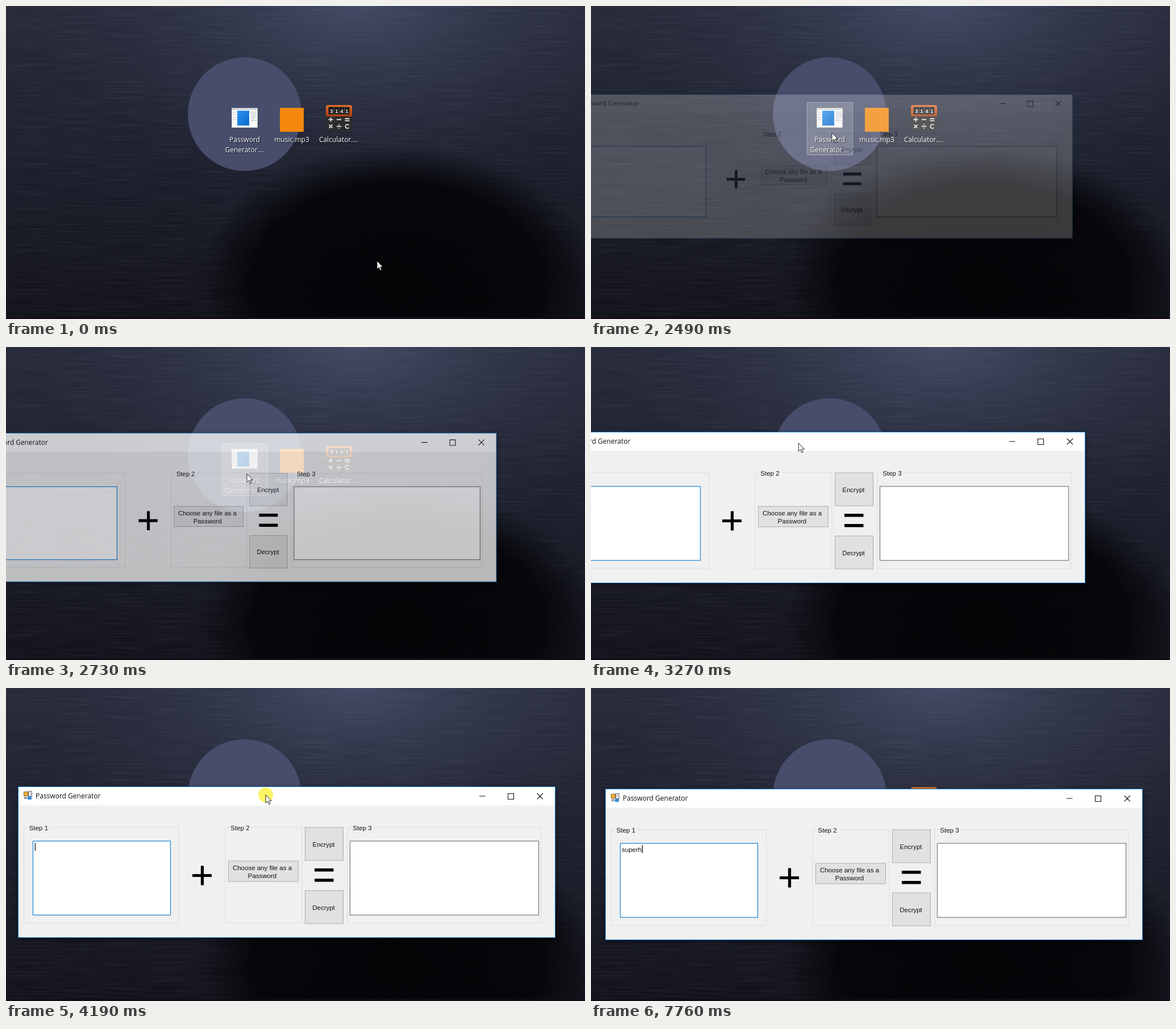
Animation of 1019 by 550 pixels, one loop 8000 ms. Source, as an HTML page:

```html
<!DOCTYPE html>
<html lang="en">
<head>
<meta charset="utf-8">
<title>Password Generator</title>
<style>
  html, body { margin: 0; width: 100%; height: 100%; overflow: hidden; background: #14151e; }
  svg { position: absolute; inset: 0; width: 100%; height: 100%; display: block; }
  #scene { will-change: transform; }
  .ui { font: 12px "Open Sans", "Noto Sans", sans-serif; }
  .form { font: 11.5px "Liberation Sans", Arial, sans-serif; fill: #111; white-space: pre; }
  .label { fill: #fff; text-anchor: middle; text-shadow: 1px 1px 2px #000; }
  .mid { text-anchor: middle; }
  .btn { fill: #e1e1e1; stroke: #adadad; }
  .group { fill: none; stroke: #dcdcdc; }
</style>
</head>
<body>
<svg viewBox="0 0 1019 550" preserveAspectRatio="none">
  <defs>
    <linearGradient id="base" x2="0" y2="1">
      <stop offset="0" stop-color="#262a39"/>
      <stop offset=".5" stop-color="#1c1f2c"/>
      <stop offset="1" stop-color="#12121a"/>
    </linearGradient>
    <radialGradient id="light" gradientUnits="userSpaceOnUse" cx="0" cy="0" r="1"
      gradientTransform="translate(610 -10) scale(570 350)">
      <stop offset="0" stop-color="#4b526f" stop-opacity=".8"/>
      <stop offset="1" stop-color="#2a2f42" stop-opacity="0"/>
    </radialGradient>
    <radialGradient id="dark" gradientUnits="userSpaceOnUse" cx="0" cy="0" r="1"
      gradientTransform="translate(690 480) scale(350 235)">
      <stop offset="0" stop-color="#050508"/>
      <stop offset=".72" stop-color="#050508" stop-opacity=".92"/>
      <stop offset="1" stop-color="#050508" stop-opacity="0"/>
    </radialGradient>
    <filter id="brushed" x="0" y="0" width="1" height="1">
      <feTurbulence type="fractalNoise" baseFrequency=".012 .5" numOctaves="2" seed="4"/>
      <feColorMatrix values="0 0 0 0 .6  0 0 0 0 .64  0 0 0 0 .8  .8 0 0 0 -.3"/>
    </filter>
  </defs>
  <rect width="1019" height="550" fill="url(#base)"/>
  <rect width="1019" height="550" fill="url(#light)"/>
  <rect width="1019" height="550" filter="url(#brushed)" opacity=".16"/>
  <rect width="1019" height="550" fill="url(#dark)"/>
  <rect y="547" width="1019" height="3" fill="#160a18"/>
  <circle cx="420" cy="190" r="100" fill="#474d6b"/>
</svg>

<svg id="scene" viewBox="0 0 1019 550" preserveAspectRatio="none">
  <defs>
    <linearGradient id="blue" x2="1" y2="1">
      <stop offset="0" stop-color="#2a95f0"/>
      <stop offset="1" stop-color="#0c68cc"/>
    </linearGradient>
    <linearGradient id="red" x2="0" y2="1">
      <stop offset="0" stop-color="#e0702c"/>
      <stop offset="1" stop-color="#a93c10"/>
    </linearGradient>
    <filter id="soft" x="-10%" y="-20%" width="120%" height="140%"><feGaussianBlur stdDeviation="5"/></filter>
  </defs>

  <g id="icons">
    <rect id="hover" x="380.5" y="169.5" width="80" height="92" fill="#fff" fill-opacity=".17" stroke="#fff" stroke-opacity=".35"/>
    <rect x="397.5" y="179.5" width="45" height="34" fill="#fafafa" stroke="#c4c8cc"/>
    <path d="M398 181.5H442" stroke="#d5d8dc" stroke-width="3"/>
    <rect x="407" y="184" width="21" height="26" fill="url(#blue)"/>
    <path d="M399.5 186.5H404.5M399.5 190.5H404.5M399.5 195.5H404.5M399.5 199.5H404.5M430.5 186.5H441M430.5 189.5H441M430.5 192.5H441M430.5 195.5H441M430.5 198.5H438M430.5 201.5H441" stroke="#b9bdc2"/>
    <rect x="482" y="179" width="42" height="42" fill="#f5890f"/>

    <rect x="563" y="174" width="46" height="46" rx="4" fill="#2c2b2d"/>
    <path d="M563 194V178Q563 174 567 174H605Q609 174 609 178V194Z" fill="url(#red)"/>
    <rect x="567.5" y="177.5" width="37" height="13" rx="1.5" fill="#1c1b1c" stroke="#6b3a22"/>
    <path d="M577.5 178V190M586.5 178V190M595.5 178V190" stroke="#555"/>
    <text id="digits" y="187.5" fill="#eee" class="mid" style="font:bold 9.5px 'Liberation Sans',sans-serif"></text>
    <path d="M567.5 199.5H575.5M571.5 195.5V203.5M582 199.5H590M596.5 198H604.5M596.5 201.5H604.5M568.5 208.5L574.5 214.5M574.5 208.5L568.5 214.5M582 211.5H590M586 207.2V209M586 214V215.8M603.5 209.5A3.4 3.4 0 1 0 603.5 213.5" fill="none" stroke="#dedede" stroke-width="1.8"/>

    <g class="ui label">
      <text x="420" y="239">Password</text>
      <text x="420.5" y="256.5">Generator....</text>
      <text x="503" y="239">music.mp3</text>
      <text x="585.5" y="239">Calculator....</text>
    </g>
  </g>

  <g id="win">
    <rect x="25" y="180" width="946" height="265" opacity=".5" filter="url(#soft)"/>
    <rect x="25.5" y="177.5" width="945" height="265" fill="#f0f0f0"/>
    <rect x="25.5" y="177.5" width="945" height="33" fill="#fff"/>
    <rect x="25.5" y="177.5" width="945" height="265" fill="none" stroke="#1883d7"/>
    <rect x="35.5" y="186.5" width="7" height="7" fill="#f0b23c" stroke="#8a6a30"/>
    <rect x="43.5" y="185.5" width="6" height="9" fill="#d8dade" stroke="#77797d"/>
    <rect x="36" y="195" width="5" height="4" fill="#9a9ca0"/>
    <rect x="42" y="195" width="7" height="5" fill="#2f8de0"/>
    <text class="ui" x="56" y="198" fill="#111">Password Generator</text>
    <path d="M837 194H847.5M887.5 189.5H897.5V199.5H887.5ZM938.7 189L949 199.3M949 189L938.7 199.3" fill="none" stroke="#111" stroke-width="1.1"/>

    <g id="groups" class="form"></g>

    <rect x="51.5" y="273" width="242" height="130" fill="#fff" stroke="#1883d7" stroke-width="1.2"/>
    <rect x="609.5" y="273" width="332" height="130" fill="#fff" stroke="#7a7a7a" stroke-width="1.2"/>
    <path d="M332 333.5H366M349.5 316.5V350.5" stroke="#000" stroke-width="5.2"/>
    <path d="M547 323.7H580.5M547 341.7H580.5" stroke="#000" stroke-width="5.4"/>
    <rect class="btn" x="395.5" y="308" width="123" height="36"/>
    <rect class="btn" x="530.5" y="249" width="67" height="58"/>
    <rect class="btn" x="530.5" y="360" width="67" height="58"/>
    <g class="form mid">
      <text x="455" y="324">Choose any file as a</text>
      <text x="455" y="338">Password</text>
      <text x="563" y="282.5">Encrypt</text>
      <text x="563" y="393.5">Decrypt</text>
    </g>
    <text id="typed" class="form" x="54" y="287.5"></text>
    <rect id="caret" y="276" width="1.2" height="14" fill="#000"/>
  </g>

  <g id="mouse">
    <circle id="press" r="13" fill="#fbf03a" opacity=".78"/>
    <path id="arrow" d="M0 0V14.6L3.4 11.4L5.7 16.8L8 15.8L5.7 10.6H10.2Z" fill="#fff" stroke="#111" stroke-width=".9"/>
    <path id="beam" d="M-3 -6.5H-.8M.8 -6.5H3M-3 6.5H-.8M.8 6.5H3M0 -6V6" stroke="#222" stroke-width="1.2" fill="none"/>
  </g>
</svg>

<script>
const $ = id => document.getElementById(id);
const LOOP = 8000;
const WORD = "superh";
const KEYS = [6210, 6520, 6840, 7070, 7300, 7760];
// [start, interval] of each stretch of screen updates
const TICKS = [[780, 80], [1180, 76], [2490, 78], [3110, 77], [3960, 78]];

const clamp = v => Math.min(1, Math.max(0, v));
const span = (t, a, b) => clamp((t - a) / (b - a));
const smooth = u => u * u * (3 - 2 * u);
const within = (t, a, b) => t >= a && t < b;
const mix = (a, b, u) => [a[0] + (b[0] - a[0]) * u, a[1] + (b[1] - a[1]) * u];
const show = (id, on) => $(id).setAttribute("visibility", on ? "visible" : "hidden");

$("groups").innerHTML = [[35.5, 273], [390, 135], [605, 340.5]].map(([x, w], i) =>
  `<rect class="group" x="${x}" y="249" width="${w}" height="168"/>
   <rect x="${x + 7}" y="246" width="39" height="7" fill="#f0f0f0"/>
   <text x="${x + 9.3}" y="254">Step ${i + 1}</text>`).join("");
$("digits").innerHTML = [..."3141"].map((d, i) => `<tspan x="${573 + i * 9}">${d}</tspan>`).join("");

function snap(t) {
  const tick = TICKS.findLast(k => k[0] <= t);
  return tick ? tick[0] + Math.floor((t - tick[0]) / tick[1]) * tick[1] : 0;
}

function windowShift(s) {
  const u = span(s, 3500, 4200);
  return [-101 * (1 - smooth(u)), -28 * (1 - u ** 1.3)];
}

function pointer(s, shift) {
  const rest = [649, 444], icon = [424, 223], grab = [360, 164];
  if (s < 780) return [653, 448];
  if (s < 860) return [651, 446];
  if (s < 2490) {
    const u = span(s, 1104, 1960);
    return mix(rest, icon, (u + smooth(u)) / 2);
  }
  if (s < 3420) return mix(icon, grab, 1 - (1 - span(s, 3033, 3340)) ** 1.8);
  const held = [grab[0] + 101 + shift[0], grab[1] + 28 + shift[1]];
  return mix(held, [173.5, 333], smooth(span(s, 4260, 4740)));
}

function draw(t) {
  const s = snap(t);
  const shift = windowShift(s);
  const [x, y] = pointer(s, shift);

  const alpha = s < 2490 ? 0 : 1 - (1 - span(s, 2406, 2866)) ** 1.25;
  const scale = .94 + .06 * alpha;
  $("win").setAttribute("opacity", alpha);
  $("win").setAttribute("transform",
    `translate(${Math.round(shift[0]) + 497.5} ${Math.round(shift[1]) + 310}) scale(${scale}) translate(-497.5 -310)`);

  const picked = within(t, 2250, 2320);
  show("hover", within(t, 1860, 2880));
  $("hover").setAttribute("height", picked ? 109 : 92);

  const text = WORD.slice(0, KEYS.filter(k => k <= t).length);
  $("typed").textContent = text;
  $("caret").setAttribute("x", text ? 54.6 + $("typed").getComputedTextLength() : 54.8);
  show("caret", !within(t, 5280, 5830));

  const inBox = s > 4260 && x < 293 && y > 273;
  $("mouse").setAttribute("transform", `translate(${x.toFixed(1)} ${y.toFixed(1)})`);
  show("press", picked || within(t, 3420, 4260) || within(t, 4740, 4810));
  show("arrow", !inBox);
  show("beam", inBox && t < KEYS[0]);
}

const begin = performance.now();
function frame() {
  draw((performance.now() - begin) % LOOP);
  requestAnimationFrame(frame);
}
draw(0);
frame();
</script>
</body>
</html>
```
